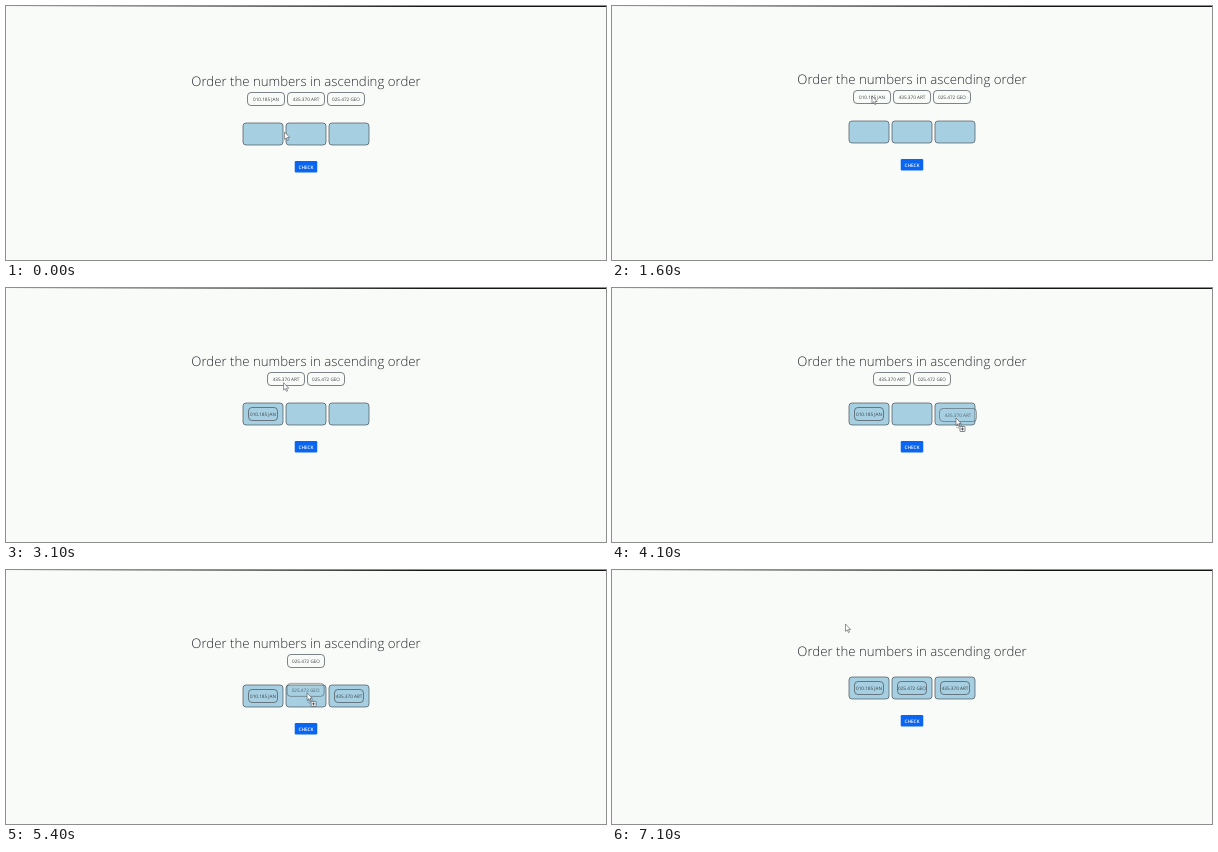
Write an HTML page with a canvas that moves like this. It is 600 px wide and 254 px high and loops after 7.2 s.

```html
<!DOCTYPE html>
<html lang="en">
<head>
<meta charset="utf-8">
<title>Order the numbers</title>
<style>
  html, body { margin: 0; height: 100%; overflow: hidden; background: #f9fbf8; }
  canvas { display: block; }
</style>
</head>
<body>
<canvas id="stage" width="600" height="254"></canvas>
<script>
const ctx = document.getElementById("stage").getContext("2d");
const LOOP = 7200, STEP = 100;
const FONT = '"Open Sans", "Noto Sans", sans-serif';
const PAPER = "#f9fbf8", INK = "#3b4145", BORDER = "#4a5156";
const MID = 300, ROW_Y = 91, SLOT_Y = 126, CHECK_Y = 158.8;

const slotX = slot => MID + 43 * (slot - 1);
const rowX = (index, count) => MID + 40 * (index - (count - 1) / 2);

// Cards leave the row from the left; grip is the pointer's offset from the card centre.
const cards = [
  { label: "010.185 JAN", slot: 0, grip: { x: 0, y: -1 } },
  { label: "435.370 ART", slot: 2, grip: { x: -2, y: 3 } },
  { label: "025.472 GEO", slot: 1, grip: { x: 1.5, y: 3 } }
].map((c, i) => ({ ...c, grab: 1600 + 1650 * i, drop: 2550 + 1650 * i }));

// The pointer visits each card and its slot, then the button, then leaves.
const stops = [{ t: 0, x: 278.5, y: 126 }];
const stop = (from, to, x, y) => {
  const last = stops[stops.length - 1];
  stops.push({ ...last, t: from }, { t: to, x, y });
};
cards.forEach((c, i) => {
  const freed = i ? cards[i - 1].drop : 0;
  stop(freed, freed + 600, rowX(0, 3 - i) + c.grip.x, ROW_Y + c.grip.y);
  stop(c.grab, c.grab + 700, slotX(c.slot) + 1, SLOT_Y + 4);
});
stop(5900, 6300, 302, 151);
stop(6500, 7100, 233.5, 54);

function pointerAt(t) {
  const next = stops.findIndex(s => s.t > t);
  if (next < 0) return stops[stops.length - 1];
  const a = stops[next - 1], b = stops[next];
  const u = (t - a.t) / (b.t - a.t), e = u * u * (3 - 2 * u);
  return { x: a.x + (b.x - a.x) * e, y: a.y + (b.y - a.y) * e };
}

function box(cx, cy, w, h, r, fill, stroke) {
  ctx.beginPath();
  ctx.roundRect(cx - w / 2, cy - h / 2, w, h, r);
  if (fill) { ctx.fillStyle = fill; ctx.fill(); }
  if (stroke) { ctx.strokeStyle = stroke; ctx.lineWidth = 0.7; ctx.stroke(); }
}

function text(str, x, baseline, size, weight, color) {
  ctx.font = `${weight} ${size}px ${FONT}`;
  ctx.textRendering = "geometricPrecision";
  ctx.textAlign = "center";
  ctx.fillStyle = color;
  ctx.fillText(str, x, baseline);
}

function card(label, x, y, w) {
  box(x, y, w, 13, 3.5, null, BORDER);
  text(label, x, y + 1.7, 4.65, 400, INK);
}

function backdrop() {
  ctx.fillStyle = PAPER;
  ctx.fillRect(0, 0, 600, 254);
  const line = ctx.createLinearGradient(0, 0, 600, 0);
  line.addColorStop(0, PAPER);
  line.addColorStop(0.7, "#141515");
  ctx.fillStyle = line;
  ctx.fillRect(0, 0, 600, 1);
}

const arrow = new Path2D("M0 0V7.4L1.7 5.9L2.9 8.6L4 8.1L2.9 5.5H5.2Z");

function pointer({ x, y }, dragging) {
  ctx.save();
  ctx.translate(x, y);
  ctx.lineWidth = 0.6;
  ctx.strokeStyle = BORDER;
  ctx.fillStyle = "#fff";
  ctx.fill(arrow);
  ctx.stroke(arrow);
  if (dragging) {
    ctx.setLineDash([1, 1]);
    ctx.strokeRect(1, 7, 4.5, 3);
    ctx.setLineDash([]);
    box(6.5, 11, 5, 5, 0.5, "#fff", BORDER);
    ctx.fillStyle = INK;
    ctx.fillRect(5, 10.6, 3, 0.8);
    ctx.fillRect(6.1, 9.5, 0.8, 3);
  }
  ctx.restore();
}

function draw(t) {
  // Once the row is empty it collapses and the centred page closes up.
  const collapse = t >= cards[2].drop ? 8 : 0;
  const scroll = t < STEP ? 2 : 0;

  backdrop();
  ctx.save();
  ctx.translate(0, scroll);
  text("Order the numbers in ascending order", MID, 77.6 + collapse, 13.22, 300, "#282c31");

  const slotY = SLOT_Y - collapse;
  for (let i = 0; i < 3; i++) box(slotX(i), slotY, 40, 22, 3, "#a6cfe1", BORDER);

  const waiting = cards.filter(c => t < c.drop);
  waiting.forEach((c, i) => card(c.label, rowX(i, waiting.length), ROW_Y, 37));
  cards.filter(c => t >= c.drop).forEach(c => card(c.label, slotX(c.slot), slotY, 29));

  box(MID, CHECK_Y - collapse, 22.5, 11.5, 1.2, "#0a66f2");
  text("CHECK", MID, CHECK_Y + 1.7 - collapse, 4.7, 600, "#fff");
  ctx.restore();

  const tip = pointerAt(t);
  const held = cards.find(c => t > c.grab && t < c.drop);
  if (held) {
    ctx.globalAlpha = 0.75;
    card(held.label, tip.x - held.grip.x, tip.y - held.grip.y, 37);
    ctx.globalAlpha = 1;
  }
  pointer(tip, held);
}

function tick() {
  const t = performance.now() % LOOP;
  draw(Math.floor(t / STEP) * STEP);
  requestAnimationFrame(tick);
}
tick();
</script>
</body>
</html>
```
